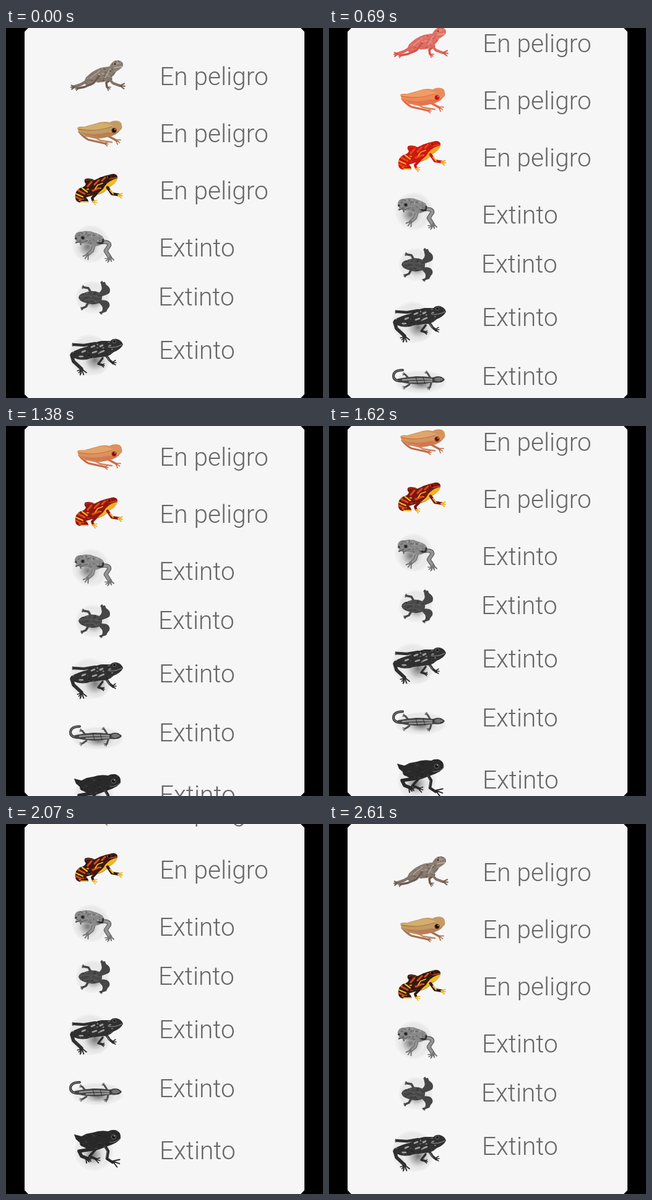
Write an HTML page that moves like this. It is 512x596 px and loops after 2710 ms.

```html
<!DOCTYPE html>
<html lang="es">
<head>
<meta charset="utf-8">
<style>
html, body { margin: 0; width: 100%; height: 100%; overflow: hidden; background: #000; }
svg { display: block; }
text { font: 300 40.6px Roboto, sans-serif; fill: #666; }
</style>
</head>
<body>
<svg id="stage" width="512" height="596" viewBox="0 0 512 596">
  <defs>
    <filter id="flush" color-interpolation-filters="sRGB">
      <feColorMatrix id="tint" type="matrix"/>
    </filter>
    <radialGradient id="shade">
      <stop offset="0" stop-color="#777"/>
      <stop offset=".4" stop-color="#b5b5b5"/>
      <stop offset=".7" stop-color="#e0e0e0"/>
      <stop offset="1" stop-color="#eee"/>
    </radialGradient>
  </defs>
  <path d="M36 0H476L482 6V590L476 596H36L30 590V6Z" fill="#f6f6f6"/>
  <g id="list"></g>
</svg>
<script>
const list = document.getElementById('list');
const tint = document.getElementById('tint');

function random(seed) {
  return () => (seed = (seed * 16807) % 2147483647) / 2147483647;
}

const fill = (d, color) => `<path d="${d}" fill="${color}"/>`;
const line = (d, color, w) =>
  `<path d="${d}" fill="none" stroke="${color}" stroke-width="${w}" stroke-linecap="round" stroke-linejoin="round"/>`;
const oval = (x, y, rx, ry, color) =>
  `<ellipse cx="${x}" cy="${y}" rx="${rx}" ry="${ry}" fill="${color}"/>`;
const eye = (x, y, r, color, ring) => oval(x, y, r, r, ring) + oval(x, y, r * .7, r * .7, color);

// Three toes fanned around a direction in degrees
function foot(x, y, dir, len, color, w = 1.6) {
  const toes = [-32, 0, 32].map(a => {
    const r = (dir + a) * Math.PI / 180;
    return `M${x} ${y}l${(len * Math.cos(r)).toFixed(1)} ${(len * Math.sin(r)).toFixed(1)}`;
  });
  return line(toes.join(''), color, w);
}

// Body shape with seeded flecks clipped to its outline
let clips = 0;
function skin(d, color, [x, y, w, h], n, colors, size) {
  const id = 'skin' + ++clips, rnd = random(clips * 7919);
  let flecks = '';
  for (let i = 0; i < n; i++) {
    flecks += oval((x + rnd() * w).toFixed(1), (y + rnd() * h).toFixed(1),
      (size * (.5 + rnd())).toFixed(1), (size * (.3 + rnd() * .5)).toFixed(1), colors[i % colors.length]);
  }
  return `<clipPath id="${id}"><path d="${d}"/></clipPath>` + fill(d, color) +
    `<g clip-path="url(#${id})">${flecks}</g>`;
}

function halo(x, y, rx, ry, dx, dy) {
  return oval(x, y, rx, ry, '#eee') + oval(x, y, rx * .9, ry * .9, '#e8e8e8') +
    oval(x + dx, y + dy, rx * .72, ry * .72, 'url(#shade)');
}

function brownFrog() {
  const c = '#83746a', dark = '#705a4e';
  return line('M170 82L162 88L163 95', dark, 3.5) + foot(163, 95, 35, 6, dark) +
    skin('M189 57Q187 53 181 52L175 53Q170 56 167 62Q154 63 146 67Q136 72 129 80Q125 86 128 91Q133 95 139 92L145 87Q156 89 166 84Q174 78 178 70Q187 65 189 61Z',
      '#8a7d72', [126, 52, 64, 42], 90, ['#75695e', '#aa9e91', '#63564c'], 1.7) +
    line('M133 84L121 91L109 95', c, 4.5) + foot(111, 95, 175, 6, dark, 2) +
    line('M150 78L141 89L127 95L116 97', dark, 3.5) + foot(117, 97, 165, 5, dark) +
    line('M168 66L160 80M151 69L136 81', '#b5a99b', 1.5) +
    line('M165 81L173 89L184 93', c, 4) + foot(184, 93, 5, 8, dark, 2) +
    line('M175 64L187 62', '#c4b6a4', 1.4) + eye(176, 58, 2.8, '#4a3b2e', '#c2b197');
}

function tanFrog() {
  const c = '#a5704a';
  return line('M118 167Q124 175 133 180L160 186', c, 3) + foot(159, 186, 10, 6, c) +
    line('M165 174L178 181', c, 3.2) + foot(177, 180, 35, 8, c) +
    fill('M115 161Q117 158 126 159L144 154Q157 149 167 152Q174 148 182 150Q187 152 187 157Q189 162 184 165Q180 171 169 174Q156 179 142 178Q126 175 118 168Z', '#c49b62') +
    fill('M116 161L130 159L147 154Q162 151 174 158L156 163Q132 167 116 163Z', '#d3ad70') +
    line('M117 163Q145 168 171 159', '#a77a43', 1.3) +
    fill('M120 168Q140 174 165 168Q180 169 185 164Q179 173 166 175Q142 182 120 168Z', '#b67f57') +
    line('M128 174Q142 174 152 181L171 184', '#c08a61', 2.6) +
    eye(174.5, 165, 4.2, '#17110d', '#614128') + oval(176, 163.5, .9, .9, '#d9c7ae');
}

function brightFrog() {
  const dark = '#321a12', gold = '#eebb28', red = '#d64a1d';
  return line('M146 267L139 274L141 279', dark, 4) + foot(140, 279, 20, 7, gold) +
    skin('M180 239Q177 233 168 236L160 238Q150 241 143 245Q136 241 128 243Q125 247 129 251Q128 256 119 258Q111 263 112 272Q112 280 119 281L133 281Q134 277 129 273Q141 269 149 268Q160 265 167 256Q178 250 180 242Z',
      dark, [112, 235, 68, 46], 60, [red, '#5a2013', '#e88b22', dark], 1.8) +
    fill('M180 242Q178 251 168 255Q159 266 147 268L157 259Q163 246 180 242Z', gold) +
    line('M117 262L127 267M113 272L121 276', red, 3) +
    line('M123 258L131 264M113 267L124 272M121 280L132 280', gold, 2.2) +
    line('M138 248L132 255M150 245L143 252M160 241L155 246M150 258L140 262', red, 3) +
    line('M156 250L148 253L144 259', gold, 1.8) +
    line('M164 257L171 267L183 269', dark, 4.6) + line('M168 261L173 267', gold, 2) +
    foot(181, 269, 10, 7, gold, 2) + line('M168 243L179 241', red, 1.6) +
    eye(167, 240, 3.2, '#0c0807', '#78321b') + line('M129 245L138 244', '#74281a', 2);
}

function toad() {
  const c = '#777', leg = 'M156 345Q167 344 167 350L161 359L168 370';
  return halo(137, 348, 30, 30, -5, 5) +
    line('M121 349L119 343L113 346', '#555', 2) +
    line(leg, '#484848', 6.5) + line(leg, '#959595', 4.6) +
    foot(168, 368, 75, 8, c, 2.2) + foot(167, 371, 145, 7, c) +
    line('M142 350L139 359L132 365', '#484848', 5.5) + line('M142 350L139 359L132 365', '#969696', 4) +
    foot(133, 364, 125, 9, c, 2) +
    skin('M111 335Q113 327 123 328Q133 325 144 330Q157 333 159 342Q157 349 148 351Q140 353 133 347L120 347Q111 343 111 335Z',
      '#898989', [110, 325, 50, 28], 110, ['#6a6a6a', '#a9a9a9', '#575757'], 1.2) +
    line('M150 346Q157 349 157 341', '#333', 3) + line('M113 344L122 346L132 342', '#555', 1) +
    eye(124, 338, 3.2, '#252525', '#606060') + eye(113, 339, 2, '#333', '#707070');
}

function topFrog() {
  const c = '#464646';
  return halo(140, 434, 27, 26, 2, 5) +
    line('M136 424L133 419L127 418M132 444L129 449L124 451', c, 3.5) +
    foot(127, 418, 195, 4, c) + foot(125, 451, 160, 4, c) +
    fill('M148 428Q157 423 154 415L153 410L160 409Q161 414 164 415Q170 420 167 427Q161 431 151 433Z', c) +
    fill('M148 440Q154 437 162 439Q169 442 167 449Q164 452 162 457L153 460Q158 452 155 448Z', c) +
    foot(156, 411, 225, 3, c) + foot(155, 457, 130, 4, c) +
    skin('M117 434Q119 428 126 427Q138 421 150 426Q156 430 155 435Q155 442 148 444Q137 447 126 442Q119 440 117 434Z',
      '#494949', [116, 421, 44, 26], 75, ['#343434', '#5c5c5c', '#3d3d3d'], 1.5) +
    line('M121 433Q136 428 153 434M126 439Q139 435 149 440', '#626262', .8) +
    eye(125, 429, 1.6, '#222', '#666') + eye(124, 439, 1.6, '#222', '#666');
}

function spottedFrog() {
  const c = '#303030';
  return halo(135, 527, 33, 33, 9, 8) +
    line('M144 508L126 511L110 510', c, 4.5) + foot(111, 510, 180, 4, c) +
    line('M126 529L106 527L109 537L122 549', c, 5.5) +
    foot(122, 549, 70, 10, c, 2) + foot(122, 550, 130, 7, c) +
    line('M156 532L149 541L156 543', c, 3.5) + foot(154, 543, 10, 5, c) +
    skin('M189 510Q187 503 179 501Q172 500 169 504L154 504Q139 507 132 513Q118 516 105 523Q102 529 111 532Q124 537 137 532L154 530Q166 530 174 522Q185 518 189 510Z',
      c, [104, 500, 84, 36], 90, ['#4c4c4c', '#202020', '#8a8a8a', '#3b3b3b'], 1.6) +
    line('M123 522L128 520M140 523L146 521M138 514L143 512M152 513L156 511M153 522L158 520M119 529L124 529', '#a3a3a3', 2.6) +
    line('M165 514Q176 516 187 510', '#888', 1.1) +
    line('M160 525L167 535L173 540', c, 4) + line('M163 530L167 536', '#808080', 1.2) +
    foot(171, 539, 0, 7, c) + eye(175, 505, 3, '#161616', '#686868');
}

// Drawn around its own strip, then moved into the list
function salamander() {
  const c = '#505050';
  const limbs = 'M129 536L123 529M130 545L124 549M164 535L159 527M165 543L163 550';
  return '<g transform="translate(0 82)">' + halo(148, 541, 41, 18, 1, 4) +
    line(limbs, c, 3) + foot(123, 529, 200, 4, c, 1.2) + foot(124, 549, 160, 5, c, 1.2) +
    foot(159, 527, 220, 4, c, 1.2) + foot(163, 549, 135, 5, c, 1.2) +
    line('M119 522Q105 522 104 531Q104 540 118 540', '#333', 4) +
    line('M119 522Q105 522 104 531Q104 540 118 540', '#757575', 1.6) +
    fill('M111 536Q126 533 142 532Q158 532 168 534Q179 529 187 537Q185 544 168 542Q148 546 132 544Q119 543 111 540Z', '#454545') +
    line('M119 538Q143 535 166 537M130 541Q148 541 166 540', '#969696', 2.6) +
    line('M140 533L143 544M152 533L155 544M168 534L168 542', '#303030', 1) +
    oval(177, 537, 6.5, 3.2, '#777') + oval(181, 534, 1, 1, '#222') + oval(181, 540, 1, 1, '#222') + '</g>';
}

function blackFrog() {
  const c = '#292929';
  return '<g transform="translate(0 165)">' + halo(142, 550, 31, 31, -2, 6) +
    line('M144 546L118 550L122 558L132 562', c, 5.5) +
    foot(129, 561, 50, 8, c, 2) + foot(130, 561, 5, 9, c) +
    line('M145 547L135 558L146 563', c, 4) + foot(144, 563, 15, 8, c) +
    skin('M185 526Q185 519 177 516Q170 515 165 518Q151 516 141 520L130 522L122 526L110 523L113 531L119 536Q119 542 125 543Q139 552 151 547L167 541Q179 537 185 530Z',
      c, [110, 515, 76, 34], 65, ['#363636', '#1a1a1a', '#414141'], 1.5) +
    line('M159 540L165 550L163 562L172 568', c, 4.5) +
    line('M159 541L164 551L162 561', '#555', 1) + foot(172, 566, 20, 12, c, 2) +
    line('M169 536Q180 535 185 529', '#757575', 1) +
    eye(174, 527, 4, '#111', '#5d5d5d') + oval(175, 525.5, .9, .9, '#ccc') + '</g>';
}

const rows = [
  ['En peligro', 248.2, 92, brownFrog],
  ['En peligro', 248.2, 184, tanFrog],
  ['En peligro', 248.2, 276, brightFrog],
  ['Extinto', 247, 368, toad],
  ['Extinto', 246, 447, topFrog],
  ['Extinto', 247, 533, spottedFrog],
  ['Extinto', 247, 628, salamander],
  ['Extinto', 248, 728, blackFrog]
];

list.innerHTML = rows.map(([label, x, y, draw]) =>
  `<g${label === 'Extinto' ? '' : ' filter="url(#flush)"'}>${draw()}</g><text x="${x}" y="${y}">${label}</text>`
).join('');

const LOOP = 2710, STEP = 30, START = 150, TURN = 2100, END = 2610, TRAVEL = 191;

function render(ms) {
  const t = Math.min(END, Math.floor(ms / STEP) * STEP);
  const down = Math.max(0, (t - START) / (TURN - START));
  const scroll = TRAVEL * (t < TURN ? down : (END - t) / (END - TURN));
  const glow = t < START ? t / START : Math.max(0, 1 - down);
  const red = Math.pow(glow, .75), keep = 1 - .12 * red;
  list.setAttribute('transform', `translate(0 ${-Math.round(scroll)})`);
  tint.setAttribute('values',
    `${1 - red} 0 0 0 ${red * .96} 0 ${keep} 0 0 0 0 0 ${keep} 0 0 0 0 0 1 0`);
}

function tick() {
  render(performance.now() % LOOP);
  requestAnimationFrame(tick);
}
render(0);
requestAnimationFrame(tick);
</script>
</body>
</html>
```
